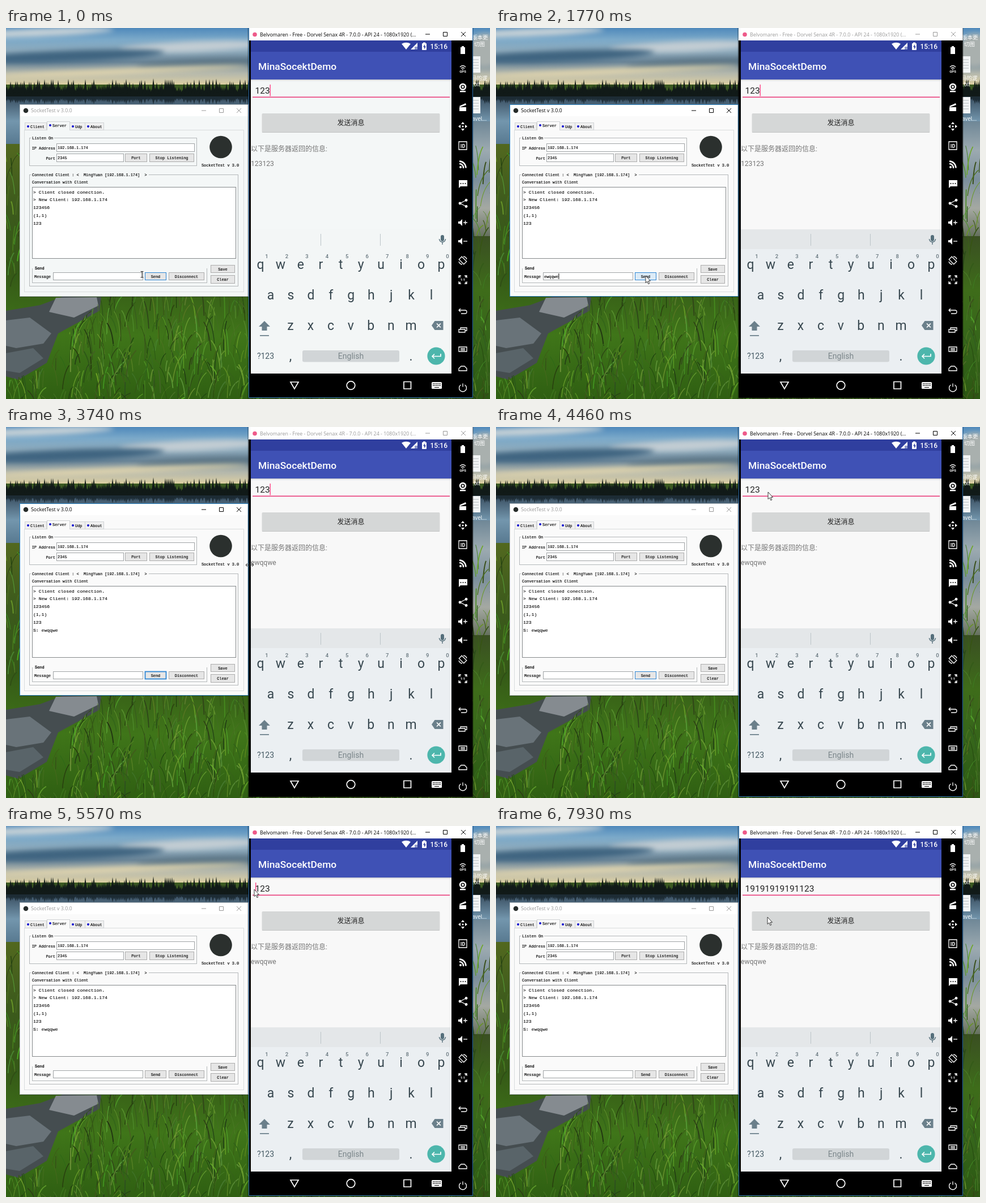
Recreate the animation shown at these times as an HTML page with a canvas. Size 854 px wide and 656 px high, loop 8000 ms.

```html
<!DOCTYPE html>
<html lang="en">
<head>
<meta charset="utf-8">
<title>Socket demo</title>
<style>
html, body { margin: 0; width: 100%; height: 100%; overflow: hidden; background: #3c5a22; }
canvas, svg { position: absolute; left: 0; top: 0; }
svg { --paper: #f8f8f8; --strip: #e4e7e9; --keys: #ebeff2; --body: #fafafa; }
svg.pale { --paper: #f4f7f7; --strip: #f3f6f6; --keys: #f3f6f6; --body: #f4f7f7; }
text { white-space: pre; }
.mid { text-anchor: middle; }
.ui { font: 8.9px "Open Sans", sans-serif; }
.form { font: 6.9px "Liberation Mono", monospace; fill: #000; stroke: #000; stroke-width: .15px; }
.log { font: 8.08px "Liberation Mono", monospace; fill: #000; stroke: #000; stroke-width: .1px; }
.app { font-family: Roboto, "Noto Sans CJK SC", "Noto Sans CJK", sans-serif; }
.key { font-size: 23px; fill: #37474f; }
.num { font-size: 9.5px; font-weight: 500; fill: #66757d; }
.desk { font: 9.5px "Noto Sans CJK SC", "Noto Sans CJK", sans-serif; fill: #fff; }
.line { fill: none; stroke: #fff; stroke-width: 1.3; }
.side text { font: bold 9px Roboto, sans-serif; text-anchor: middle; fill: #fff; }
</style>
</head>
<body>
<canvas id="back" width="854" height="656"></canvas>
<svg id="stage" width="854" height="656" viewBox="0 0 854 656"></svg>
<script>
// Landscape wallpaper
const g = document.getElementById('back').getContext('2d');
let seed = 7;
const rnd = () => (seed = (seed * 16807) % 2147483647) / 2147483647;

function fade(x, y, w, h, ...colors) {
  const grad = g.createLinearGradient(0, y, 0, y + h);
  colors.forEach((c, i) => grad.addColorStop(i / (colors.length - 1), c));
  g.fillStyle = grad;
  g.fillRect(x, y, w, h);
}
function cloud(x, y, rx, ry, color) {
  g.fillStyle = color;
  g.beginPath();
  g.ellipse(x, y, rx, ry, -.04, 0, 7);
  g.fill();
}
function shape(color, ...p) {
  g.fillStyle = color;
  g.beginPath();
  for (let i = 0; i < p.length; i += 2) g.lineTo(p[i], p[i + 1]);
  g.fill();
}
function grass(count, top, bottom) {
  for (let i = 0; i < count; i++) {
    const x = rnd() * 854, y = top + (bottom - top) * i / count, lean = (rnd() - .45) * 36, h = 18 + rnd() * 34;
    g.strokeStyle = `hsl(${82 + rnd() * 22} ${45 + rnd() * 20}% ${14 + rnd() * 28}%)`;
    g.lineWidth = .7 + rnd() * 1.3;
    g.beginPath();
    g.moveTo(x, y);
    g.quadraticCurveTo(x + lean * .2, y - h * .7, x + lean, y - h);
    g.stroke();
  }
}
function wallpaper() {
  fade(0, 0, 854, 100, '#4f89bb', '#7ba9c9', '#8eabbd', '#6d8799', '#b3b7ad', '#dccfa2');
  g.filter = 'blur(5px)';
  cloud(60, 8, 130, 7, '#c9d3d7');
  cloud(330, 33, 130, 9, '#c3cdd3');
  cloud(110, 50, 170, 10, '#3f6480');
  cloud(360, 62, 130, 8, '#5d7686');
  cloud(200, 77, 230, 5, '#e3d6ad');
  cloud(845, 40, 30, 30, '#a9b0ae');
  g.filter = 'none';
  fade(0, 118, 854, 140, '#34485a', '#7396ad', '#54758c', '#3c5766');
  for (let x = -4; x < 860; x += 3) {
    const h = 10 + rnd() * 20;
    shape('#111a18', x - 4, 121, x, 119 - h, x + 4, 121);
    shape('#1d2c35', x - 3, 121, x, 122 + h * .45, x + 3, 121);
  }
  fade(823, 165, 31, 205, '#6f8797', '#9caab0', '#7b8f9c', '#a5a9a2', '#626e5b');
  fade(0, 205, 428, 451, '#52681f', '#3c5a1c', '#355817', '#3f7519', '#2f5f12');
  fade(823, 368, 31, 288, '#3a4f22', '#3e6c1a', '#35651a', '#2b5712');
  grass(600, 235, 470);
  shape('#454d50', 0, 500, 60, 490, 100, 475, 168, 476, 165, 500, 92, 540, 72, 592, 22, 622, 0, 616);
  shape('#858b90', 88, 477, 160, 476, 163, 491, 120, 512, 76, 502);
  shape('#697379', 0, 517, 42, 512, 80, 540, 66, 558, 18, 566, 0, 562);
  shape('#596469', 0, 575, 48, 566, 66, 584, 24, 610, 0, 606);
  const clear = new Path2D('M175 474H854V700H0V625L70 600L110 540Z');
  g.save();
  g.clip(clear);
  grass(1000, 490, 700);
  g.restore();
}
wallpaper();

// Markup helpers
const R = (x, y, w, h, fill, more = '') => `<rect x="${x}" y="${y}" width="${w}" height="${h}" fill="${fill}" ${more}/>`;
const box = (x, y, w, h, fill = 'none', stroke = '#bbb', more = '') => R(x + .5, y + .5, w, h, fill, `stroke="${stroke}" ${more}`);
const T = (x, y, s, cls, more = '') => `<text x="${x}" y="${y}" class="${cls}" ${more}>${s.replace(/</g, '&lt;')}</text>`;
const P = (d, more = 'fill="#fff"') => `<path d="${d}" ${more}/>`;
const L = d => P(d, 'class="line"');
const C = (x, y, r, fill) => `<circle cx="${x}" cy="${y}" r="${r}" fill="${fill}"/>`;
const button = (x, y, w, h, s, id = '') =>
  box(x, y, w, h, '#e6e6e6', '#adadad', id && `id="${id}"`) + T(x + w / 2 + .5, y + h / 2 + 3, s, 'form mid');
const group = (x, y, w, h, s, gap) => box(x, y, w, h, 'none', '#b4b8ba') + R(x + 3, y - 2, gap, 5, 'var(--body)') + T(x + 5, y + 2.5, s, 'form');
const controls = (a, b, c, y) => P(`M${a - 4} ${y}h8M${b - 3.5} ${y - 3.5}h7v7h-7zM${c - 4} ${y - 4}l8 8m0-8l-8 8`, 'fill="none" stroke="currentColor"');

const desktop = T(822, 20, '版本更', 'desk') + T(826, 32, '切图', 'desk') +
  [50, 122].map(y => R(822, y, 15, 29, '#f3f5f6') + P(`M824 ${y + 6}h10m-10 5h10m-10 5h10m-10 5h10`, 'stroke="#b4babd"')).join('') +
  T(821, 92, '码的逻', 'desk') + T(823, 103, '.txt', 'desk') + T(822, 164, 'avel...', 'desk');

const tab = (x, w, y, s) => box(x, y, w, 180 - y, y < 166 ? 'var(--body)' : '#f0f0f0', '#d0d3d5') +
  C(x + 6, y + 7, 2, '#1010d0') + T(x + 10, y + 9.5, s, 'form');
const server = `<g id="server">` + R(24, 135, 404, 341, '#000', 'opacity=".18"') + box(24, 135, 403, 339, '#fff', '#2a83c4', 'id="frame"') +
  R(25, 156, 402, 318, 'var(--body)') + C(35, 146, 4.3, '#262b29') + T(44, 149, 'SocketTest v 3.0.0', 'ui', 'fill="currentColor"') +
  controls(349, 380, 411, 146) +
  box(32, 180, 387, 286, 'none', '#d9dcdd') + tab(33, 38, 167, 'Client') + tab(112, 27, 167, 'Udp') + tab(139, 33, 167, 'About') +
  tab(72, 40, 165, 'Server') + R(73, 179, 39, 3, 'var(--body)') +
  group(41, 194, 295, 49, 'Listen On', 41) +
  T(87, 214.5, 'IP Address', 'form', 'text-anchor="end"') + box(89, 204, 243, 14, '#fff', '#a0a4a6') + T(91, 214, '192.168.1.174', 'form') +
  T(87, 232.5, 'Port', 'form', 'text-anchor="end"') + box(89, 222, 118, 14, '#fff', '#a0a4a6') + T(91, 232, '2345', 'form') +
  button(210, 222, 38, 14, 'Port') + button(253, 222, 78, 14, 'Stop Listening') +
  C(379, 210.5, 19.8, '#2b302e') + T(378, 244.5, 'SocketTest v 3.0', 'form mid') +
  group(41, 259, 368, 197, 'Connected Client : <  MingYuan [192.168.1.174]  >', 208) + T(46, 275, 'Conversation with Client', 'form') +
  box(46, 281, 359, 126, '#fff', '#85898b') +
  ['> Client closed conection.', '> New Client: 192.168.1.174', '123456', '(1,1)', '123'].map((s, i) => T(48, 292.5 + i * 13.8, s, 'log')).join('') +
  T(48, 361.5, 'S: ewqqwe', 'log', 'id="sent"') +
  group(46, 424, 308, 26, 'Send', 21) + R(46, 423, 309, 2, 'var(--body)') + T(51, 426.5, 'Send', 'form') +
  T(50, 442, 'Message', 'form') + box(83, 432, 158, 13, '#fff', '#a0a4a6') + T(85, 441.5, '', 'form', 'id="draft"') +
  R(97, 434, 1, 10, '#000', 'id="bar"') +
  button(245, 432, 37, 13, 'Send', 'send') + button(287, 432, 62, 13, 'Disconnect') +
  button(361, 419, 42, 13, 'Save') + button(361, 437, 42, 14, 'Clear') + '</g>';

// Emulator tool strip, icons centred on their own origin
const speaker = 'M-8-2h3l4-4v12l-4-4h-3z';
const tools = {
  39: R(-4, -5, 8, 12, '#fff') + R(-2, -7, 4, 3, '#fff'),
  72: L('M-5-3q5-5 10 0M-3-.5q3-3 6 0') + C(0, 1, 1, '#fff') + T(0, 7, 'GPS', '', 'style="font-size:6px"'),
  105: C(0, -1, 6.2, '#fff') + C(0, -1, 3.6, '#000') + C(0, -1, 2, '#fff') + R(-5, 6, 10, 2.4, '#fff'),
  140: R(-6, 0, 12, 7, '#fff') + P('M-6-2l11-5 1 3-11 4z'),
  174: P('M0-8l3 4h-6zM0 8l3-4h-6zM-8 0l4-3v6zM8 0l-4-3v6z') + C(0, 0, 1.6, '#fff'),
  208: L('M-7-7h14v14h-14z') + T(0, 3.5, 'ID', ''),
  241: C(-4, 5, 2, '#fff') + P('M-6-1a7 7 0 0 1 7 8M-6-5.5a12 12 0 0 1 11.5 12', 'class="line" style="stroke-width:2.4"'),
  275: P('M-7-6h15v11h-12l-3 3z') + [-3.5, .5, 4.5].map(x => C(x, 0, 1, '#000')).join(''),
  310: L('M6-5.5L-5 0L6 5.5') + C(-5, 0, 2.4, '#fff') + C(6, -5.5, 2.4, '#fff') + C(6, 5.5, 2.4, '#fff'),
  344: P(speaker) + L('M1 0h7M4.5-3.5v7'),
  377: P(speaker) + L('M1 0h7'),
  411: `<g transform="rotate(-45)">${L('M-3.5-6h7v12h-7z')}</g>` + L('M-7 2a7 7 0 0 0 6 5M7-2a7 7 0 0 0-6-5'),
  445: L('M-7-3v-4h4M3-7h4v4M7 3v4h-4M-3 7h-4v-4M-7-7l3 3M7-7l-3 3M7 7l-3-3M-7 7l3-3') + T(0, 2, '1:1', '', 'style="font-size:6px"'),
  500: L('M-4-4l-3 3 3 3M-7-1h11a3 3 0 0 1 0 6h-7'),
  534: L('M-7-1h11v5h-11zM-4-1v-3h11v5h-3'),
  568: L('M-7-4h14v8h-14zM-4-1h8M-4 1.5h8'),
  602: L('M-7 4v-4l4-4h6l4 4v4z'),
  636: L('M-3.5-5a6.5 6.5 0 1 0 7 0M0-7.5v6')
};
const side = '<g class="side">' + Object.entries(tools).map(([y, s]) => `<g transform="translate(806 ${y})">${s}</g>`).join('') + '</g>';

const row = (letters, x, y, cls) => [...letters].map((c, i) => T(x + i * 35.45, y, c, 'app mid ' + cls)).join('');
const keyboard = R(432, 356, 354, 35, 'var(--strip)') + R(432, 391, 354, 220, 'var(--keys)') +
  P('M555.5 364v21M660.5 364v21', 'stroke="#bcc4c8"') +
  R(767, 366, 6, 11, '#546e7a', 'rx="3"') + P('M764.5 373a5.5 5.5 0 0 0 11 0M770 379v4', 'fill="none" stroke="#546e7a" stroke-width="1.4"') +
  row('qwertyuiop', 449, 426, 'key') + row('1234567890', 460, 407, 'num') + row('asdfghjkl', 467, 480, 'key') + row('zxcvbnm', 502, 534, 'key') +
  P('M456 518l10 10h-5.500v7h-9v-7h-5.500zM448 543h16v1.700h-16z', 'fill="#6b808b"') +
  P('M751 526l5.500-8h15v16h-15zM759 522.500l7 7m0-7l-7 7', 'fill="#6b808b"') + P('M760 522.500l7 7m0-7l-7 7', 'stroke="#fff" stroke-width="1.6"') +
  T(458, 585, '?123', 'app mid', 'font-size="14" fill="#455a64"') + T(502, 588, ',', 'app mid key') + T(714.500, 588, '.', 'app mid key') +
  R(523, 570, 171, 20.500, '#d1d5d7', 'rx="3"') + T(608.500, 585, 'English', 'app mid', 'font-size="14" fill="#7b868b"') +
  C(759, 580, 15.600, '#4db6ac') + P('M767 576v4.500h-15m4-4l-4 4 4 4', 'fill="none" stroke="#fff" stroke-width="1.7"');

const phone = `<g id="phone">` + R(426, 0, 399, 656, '#000', 'opacity=".2"') + R(428, 0, 395.500, 654, '#000') + R(428, 0, 395.500, 22, '#fff') +
  C(439, 11.500, 3.800, '#ee5a8a') + T(448, 14.500, 'Belvomaren - Free - Dorvel Senax 4R - 7.0.0 - API 24 - 1080x1920 (...', 'ui', 'fill="currentColor"') +
  controls(744, 775, 807, 11) +
  R(432, 91, 354, 265, 'var(--paper)') + R(432, 91, 354, 1, '#c6c8ce') + R(432, 92, 354, 2, '#e8e9ec') +
  R(432, 22, 354, 20, '#303f9f') + R(432, 42, 354, 49, '#3f51b5') +
  P('M698 28q8-4.500 16 0l-8 10zM726 26v12h-12z') + P('M726 26v7h-5v5h5z', 'fill="#8f98cb"') +
  R(734, 27, 8, 12, '#fff', 'rx="1"') + R(736, 25.500, 4, 2, '#fff') + P('M739 29l-3 4.500h2v4l3-5h-2z', 'fill="#303f9f"') +
  T(748.500, 37, '15:16', 'app', 'font-size="12" font-weight="500" fill="#fff"') +
  T(445, 74, 'MinaSocektDemo', 'app', 'font-size="17.4" font-weight="500" fill="#fff"') +
  T(439.500, 116, '123', 'app', 'id="entry" font-size="15.5" fill="#212121"') + R(435, 121.500, 348, 1.600, '#e93d7b') +
  R(465.500, 100, 1.400, 20.500, '#ff4081', 'id="caret"') +
  R(451.500, 183, 314, 2, '#c2c4c4', 'rx="2"') + R(451.500, 151, 314, 33, '#d5d7d7', 'rx="2"') +
  T(608.500, 171.500, '发送消息', 'app mid', 'font-size="12" font-weight="500" fill="#212121"') +
  T(432, 218, '以下是服务器返回的信息:', 'app', 'font-size="12" fill="#757575"') +
  T(432, 243.500, '', 'app', 'id="reply" font-size="12.1" fill="#757575"') + keyboard +
  P('M502 626h14l-7 12z', 'class="line" style="stroke-width:1.7"') +
  '<circle cx="608.500" cy="632" r="7.300" class="line" style="stroke-width:1.7"/>' + P('M702 625.500h12.500v12.500h-12.500z', 'class="line" style="stroke-width:1.7"') +
  R(751, 626, 18, 12, '#fff', 'rx="1.500"') + P('M753 629h14m-14 3h14', 'stroke="#000" stroke-width="1.5" stroke-dasharray="1.500 1"') + P('M756 635.500h8', 'stroke="#000"') +
  side + P('M428.500 0V653.500H823.500V0', 'id="edge" fill="none" stroke="#2a6fae"') + '</g>';

const pointers = P('M0 0v12.500l2.800-2.500 2 4.600 2-.8-2-4.500h3.700z', 'id="arrow" fill="#fff" stroke="#222" stroke-width=".9"') +
  P('M-2.500-5.500h5M0-5.500v10.500M-2.500 5h5', 'id="beam" fill="none" stroke="#222"') +
  P('M-7 0h14M-4-3l-3 3 3 3M4-3l3 3-3 3M-1-4v8M1-4v8', 'id="resize" fill="none" stroke="#222" stroke-width=".9"');

const stage = document.getElementById('stage');
stage.innerHTML = desktop + server + phone + pointers;
const $ = id => document.getElementById(id);
const show = (id, on) => $(id).style.display = on ? '' : 'none';
const within = (t, spans) => spans.some(([a, b]) => t >= a && t < b);

// Pointer stops: time, x, y
const path = [
  [0, 240, 436], [150, 228, 437], [300, 218, 438], [1380, 228, 439], [1510, 248, 440], [1640, 262, 439], [1770, 264, 438],
  [2190, 290, 410], [2330, 345, 335], [2470, 385, 285], [2610, 394, 270], [2750, 396, 268],
  [3180, 402, 262], [3460, 415, 252], [3740, 430, 244], [3880, 462, 228], [4020, 492, 196],
  [4170, 490, 160], [4310, 484, 130], [4450, 480, 115], [4580, 478, 110], [4860, 466, 114], [5000, 455, 117], [5120, 447, 118],
  [5270, 442, 116], [5410, 438, 112], [5690, 435, 107], [7810, 460, 138], [7930, 479, 161]
];
const blink = [[0, 300], [730, 1250], [1770, 2330], [2750, 3180], [3600, 4170], [4720, 5120], [5410, 5970], [6530, 7810]];

function draw() {
  const t = performance.now() % 8000;
  const serverOn = t >= 150 && t < 4310;
  stage.classList.toggle('pale', t < 150);
  $('server').style.color = serverOn ? '#000' : '#999';
  $('phone').style.color = serverOn ? '#999' : '#000';
  $('frame').setAttribute('stroke', serverOn ? '#2a83c4' : '#b5bcc0');
  show('edge', !serverOn);

  const typed = t < 730 || t >= 1910 ? 0 : Math.min(6, 2 + Math.floor((t - 730) / 130));
  $('draft').textContent = 'ewqqwe'.slice(0, typed);
  $('bar').setAttribute('x', 85.5 + typed * 4.14);
  show('bar', t >= 300 && t < 1910);
  show('sent', t >= 1910);
  $('reply').textContent = t < 2050 ? '123123' : 'ewqqwe';

  const thick = t >= 1910 && t < 4310;
  const thin = t < 150 || t >= 1510 && t < 5120;
  $('send').setAttribute('stroke', thick || thin ? '#2f86d3' : '#adadad');
  $('send').setAttribute('stroke-width', thick ? 1.8 : 1);
  $('send').setAttribute('fill', t >= 1510 && t < 3040 ? '#dcebf7' : '#e6e6e6');

  const digits = t < 6530 ? 0 : Math.min(11, 1 + 2 * Math.floor((t - 6520) / 140));
  $('entry').textContent = '19191919191'.slice(0, digits) + '123';
  $('caret').setAttribute('x', t < 5410 ? 465.5 : 440 + digits * 8.7);
  show('caret', within(t, blink));

  const [, x, y] = path.findLast(p => p[0] <= t);
  const kind = t < 1510 ? 'beam' : t >= 3740 && t < 3880 ? 'resize' : 'arrow';
  for (const id of ['arrow', 'beam', 'resize']) {
    show(id, id === kind);
    $(id).setAttribute('transform', `translate(${x} ${y})`);
  }
  requestAnimationFrame(draw);
}
draw();
</script>
</body>
</html>
```
